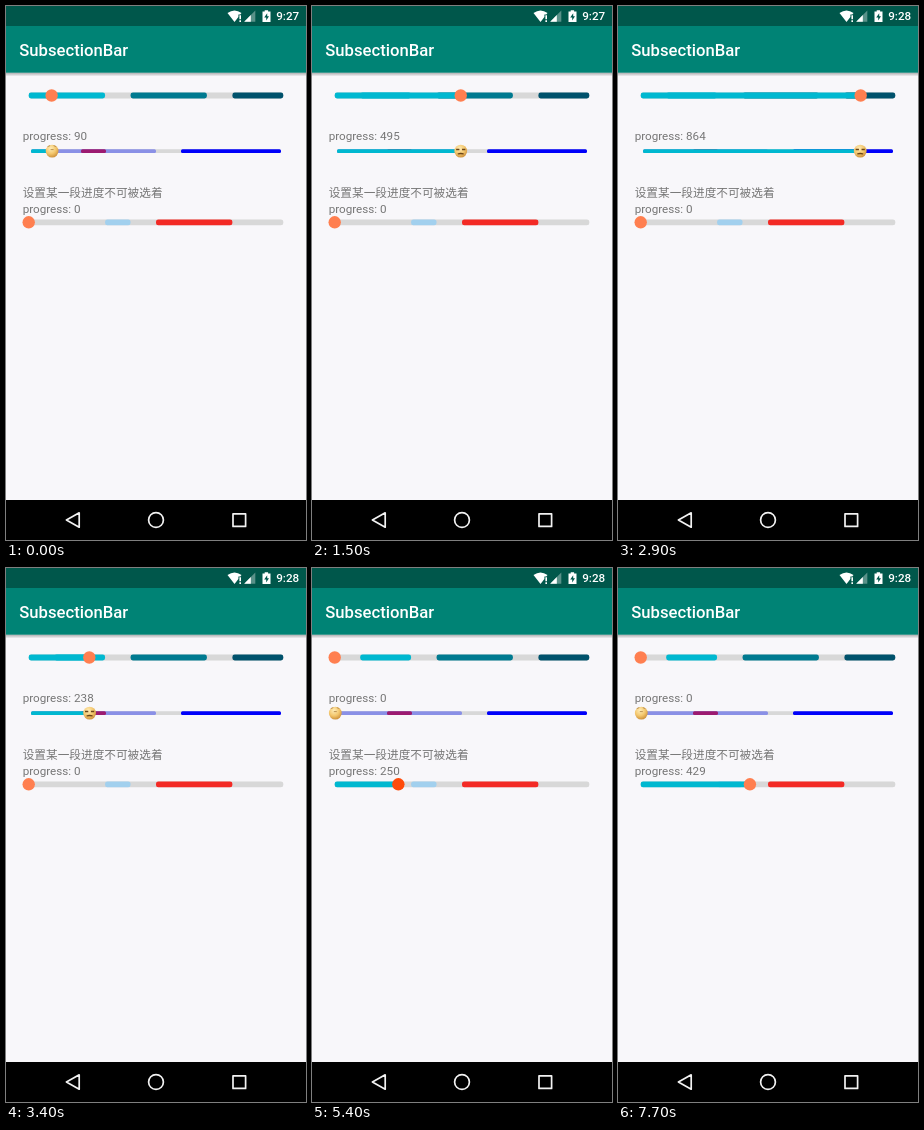
Write an HTML page that moves like this. It is 300 px wide and 534 px high and loops after 7.8 s.

```html
<!DOCTYPE html>
<html lang="en">
<head>
<meta charset="utf-8">
<title>SubsectionBar</title>
<style>
  html, body { margin: 0; width: 100%; height: 100%; overflow: hidden; background: #f8f7fa; }
  svg { display: block; width: 100vw; height: 100vh; }
  text { font-family: Roboto, "Noto Sans CJK SC", "Noto Sans CJK", sans-serif; font-size: 11.67px; fill: #767676; }
  .light { fill: #fff; font-weight: 500; }
  .title { font-size: 16.67px; }
</style>
</head>
<body>
<svg viewBox="0 0 300 534">
  <defs>
    <linearGradient id="shadow" x2="0" y2="1">
      <stop stop-color="#000" stop-opacity=".32"/>
      <stop offset="1" stop-color="#000" stop-opacity="0"/>
    </linearGradient>
    <radialGradient id="gold" cx=".4" cy=".3" r=".75">
      <stop stop-color="#ffedb8"/>
      <stop offset=".55" stop-color="#f3c66c"/>
      <stop offset="1" stop-color="#c98a35"/>
    </radialGradient>
  </defs>

  <rect width="300" height="534" fill="#f8f7fa"/>
  <rect y="66.5" width="300" height="4" fill="url(#shadow)"/>
  <rect width="300" height="20" fill="#00574b"/>
  <rect y="20" width="300" height="46.7" fill="#008375"/>
  <text class="light title" x="13.3" y="50">SubsectionBar</text>

  <g fill="#fff">
    <path d="M221.5 7Q228.5 1.8 235.5 7L234.3 8.6H232.4V11L228.5 16Z"/>
    <path d="M233.4 9.3h1.6v4h-1.6zM233.4 14.3h1.6V16h-1.6z"/>
    <path d="M249.3 4.6V15.8H238.2Z" opacity=".35"/>
    <path d="M244.8 9.1V15.8H238.2Z"/>
    <path d="M256.5 5.6h2.2V4.3h3.4v1.3h2.4V16h-8z"/>
  </g>
  <path d="M261.2 7.2L258.2 11.4H260.2V14.4L263 10.2H261.2Z" fill="#00574b"/>
  <text class="light" id="clock" x="270.2" y="14.4"></text>

  <text id="label2" x="16.7" y="133.5"></text>
  <text x="16.7" y="191">设置某一段进度不可被选着</text>
  <text id="label3" x="16.7" y="207"></text>
  <g id="bars"></g>

  <rect y="494" width="300" height="40" fill="#000"/>
  <g fill="none" stroke="#f2f2f2" stroke-width="1.7" stroke-linejoin="round">
    <path d="M73.2 506.8V521.2L60.4 514Z"/>
    <circle cx="150" cy="514" r="7.4"/>
    <rect x="227" y="507.8" width="12.6" height="12.6"/>
  </g>
</svg>
<script>
const LOOP = 7800, STEP = 100;
const CYAN = '#00b8d0', GREY = '#d8d8d8', LILAC = '#8a90e6', CORAL = '#ff7f50', PRESSED = '#ff4b0a';
const byId = id => document.getElementById(id);

// [time, progress]
const upperKeys = [[700, 90], [1000, 215], [1500, 495], [1700, 505], [1800, 505], [2300, 805],
  [2600, 850], [2700, 848], [2800, 848], [3000, 880], [3400, 238], [3600, 118], [4000, 0]];
const lowerKeys = [[4700, 0], [5200, 160], [5700, 385], [5900, 404], [6000, 404], [6300, 285],
  [6800, 350], [7300, 429]];

function add(parent, tag, attrs) {
  const node = document.createElementNS('http://www.w3.org/2000/svg', tag);
  for (const name in attrs) node.setAttribute(name, attrs[name]);
  return parent.appendChild(node);
}

function makeBar(left, right, y, height, sections) {
  const group = add(byId('bars'), 'g', {});
  const scale = (right - left) / 1000;
  const strip = (from, to, fill) => add(group, 'rect', {
    x: left + from * scale, y: y - height / 2, width: (to - from) * scale, height, rx: height * 0.4, fill
  });
  strip(0, 1000, GREY);
  sections.forEach(section => strip(...section));
  const done = strip(0, 0, CYAN);
  const thumb = add(group, 'g', {});
  return {
    thumb,
    set(progress, start = left) {
      const x = start + progress * (2 * (left - start) + right - left) / 1000;
      done.setAttribute('width', Math.max(0, x - left));
      thumb.setAttribute('transform', `translate(${x} ${y})`);
    }
  };
}

const top1 = makeBar(22.7, 277.3, 89.5, 5.8,
  [[100, 300, CYAN], [400, 700, '#007a90'], [800, 1000, '#00526c']]);
const middle = makeBar(25, 275, 145.1, 3.8,
  [[0, 500, LILAC], [200, 300, '#9c1a70'], [600, 1000, '#0000fa']]);
const lower = makeBar(22.7, 277.3, 216.3, 5.8,
  [[300, 400, '#a2d0ee'], [500, 800, '#f32a25']]);

add(top1.thumb, 'circle', { r: 6.2, fill: CORAL });
const lowerDot = add(lower.thumb, 'circle', { r: 6.2, fill: CORAL });

add(middle.thumb, 'circle', { r: 6.4, fill: 'url(#gold)' });
const calm = add(middle.thumb, 'path', {
  d: 'M-4.5 -4.5L-2 -5.5M1.5 -5.5L4 -4.5M-1.5 -1.5H1.5', stroke: '#b58a4a', 'stroke-width': 0.9
});
const face = add(middle.thumb, 'path', {
  d: 'M-4.6 -1.6H-1.3M1.3 -1.6H4.6M-3 2.9Q0 1.9 3 2.9', fill: 'none', stroke: '#6b4317', 'stroke-width': 1.3
});

function valueAt(keys, t) {
  if (t <= keys[0][0]) return keys[0][1];
  const next = keys.findIndex(key => key[0] >= t);
  if (next < 0) return keys[keys.length - 1][1];
  const [t0, v0] = keys[next - 1], [t1, v1] = keys[next];
  return Math.round(v0 + (v1 - v0) * (t - t0) / (t1 - t0));
}

function draw(ms) {
  const t = Math.floor((ms % LOOP) / STEP) * STEP;
  const upper = valueAt(upperKeys, t), low = valueAt(lowerKeys, t);
  const dragging = t >= 800 && t < 4200;
  top1.set(upper);
  middle.set(upper, 23.3);
  lower.set(low);
  face.setAttribute('visibility', dragging ? 'visible' : 'hidden');
  calm.setAttribute('visibility', dragging ? 'hidden' : 'visible');
  lowerDot.setAttribute('fill', t >= 4700 && t < 7500 ? PRESSED : CORAL);
  byId('label2').textContent = `progress: ${upper}`;
  byId('label3').textContent = `progress: ${low}`;
  byId('clock').textContent = t < 1600 ? '9:27' : '9:28';
}

const begin = performance.now();
function tick() {
  draw(performance.now() - begin);
  requestAnimationFrame(tick);
}
tick();
</script>
</body>
</html>
```
